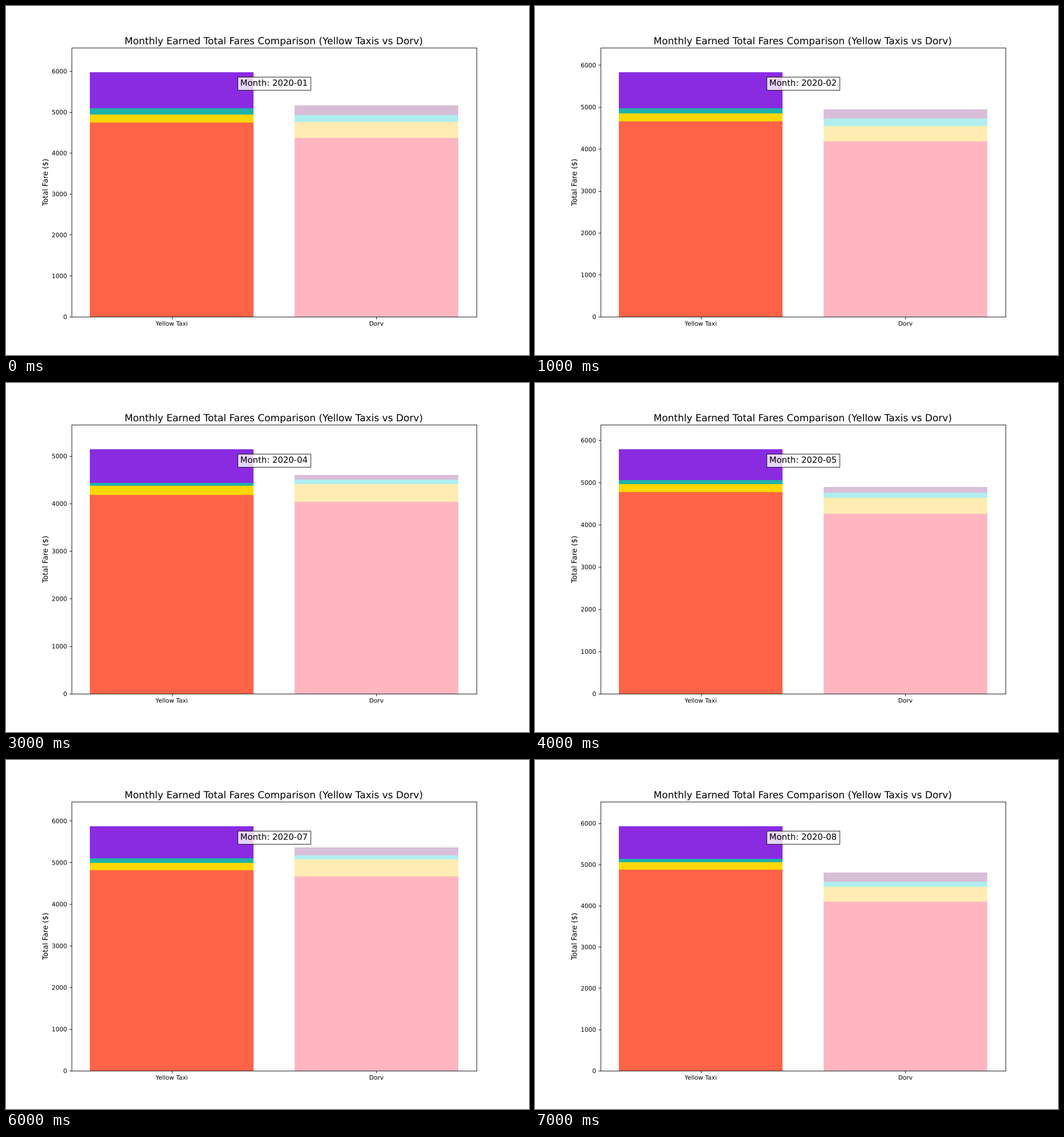
A matplotlib script that plays this animation: 917x611 px, repeating every 8 s.

```python
import matplotlib.pyplot as plt
import numpy as np
from matplotlib import patheffects
from matplotlib.animation import FuncAnimation

W, H = 917, 611
DPI = H / 8
MONTHS = 8

APP = "Dorv"
TAXI_COLORS = ["tomato", "gold", "lightseagreen", "blueviolet"]
APP_COLORS = ["lightpink", "#ffecb3", "paleturquoise", "thistle"]

# Drawing glyphs as outlines keeps their subpixel positions
plt.rcParams.update({
    "font.family": "DejaVu Sans",
    "text.hinting": "none",
    "path.effects": [patheffects.Normal()],
})


def trend(months, values):
    """One value per month, straight lines between key months."""
    return np.interp(range(MONTHS), months, values)


taxi_fare = trend(range(MONTHS), [4749, 4657, 4345, 4183, 4772, 5054, 4805, 4867])
taxi_parts = [
    taxi_fare,
    np.full(MONTHS, 187),
    trend([0, 3, 5, 7], [154, 60, 129, 76]),
    trend([0, 2, 3, 7], [879, 838, 708, 793]),
]

app_fare = trend([0, 2, 3, 5, 6, 7], [4365, 3987, 4039, 4467, 4654, 4094])
app_parts = [
    app_fare,
    0.0895 * app_fare,
    trend([0, 2, 3, 5, 6, 7], [161, 178, 96, 143, 103, 117]),
    trend([0, 2, 3, 7], [244, 193, 108, 221]),
]

# The small surplus keeps the width from truncating to one pixel less
fig, ax = plt.subplots(figsize=((W + 0.01) / DPI, H / DPI), dpi=DPI)


def draw_stack(x, parts, colors, month):
    """Stack the month's parts at x and return the total height."""
    top = 0
    for part, color in zip(parts, colors):
        ax.bar(x, part[month], bottom=top, color=color, width=0.8)
        top += part[month]
    return top


def draw_month(month):
    ax.clear()
    taxi = draw_stack(0, taxi_parts, TAXI_COLORS, month)
    app = draw_stack(1, app_parts, APP_COLORS, month)
    ax.set_xlim(-0.49, 1.49)
    ax.set_ylim(0, 1.1 * max(taxi, app))
    ax.set_xticks([0, 1], ["Yellow Taxi", APP])
    ax.set_ylabel("Total Fare ($)", fontsize=12)
    ax.set_title(
        f"Monthly Earned Total Fares Comparison (Yellow Taxis vs {APP})",
        fontsize=16,
    )
    ax.text(
        0.5, 0.859, f"Month: 2020-{month + 1:02d}",
        transform=ax.transAxes, ha="center", fontsize=14,
        bbox=dict(facecolor="white", alpha=0.8, edgecolor="black"),
    )
    return []


def reset():
    return draw_month(0)


anim = FuncAnimation(fig, draw_month, frames=MONTHS, init_func=reset,
                     interval=1000, repeat=True, repeat_delay=0)
plt.show()
```
